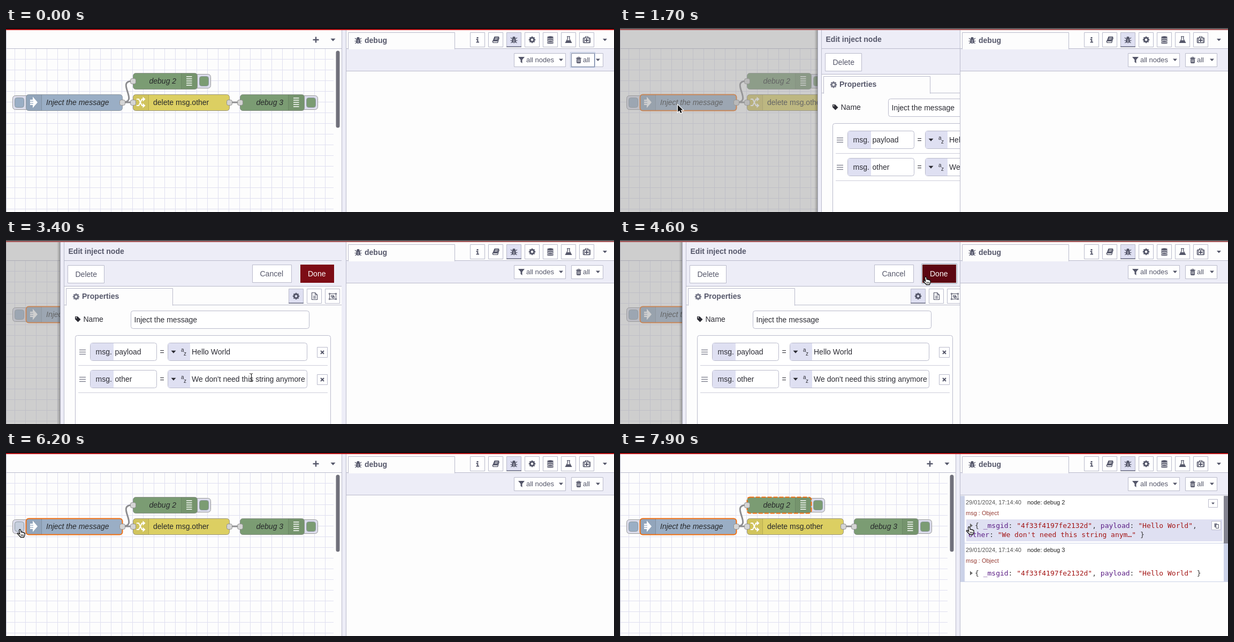
Write an HTML page with a canvas that moves like this. It is 1136 by 344 pixels and loops after 8000 ms.

```html
<!DOCTYPE html>
<html lang="en">
<head>
<meta charset="utf-8">
<title>Flow editor</title>
<style>
html, body { margin: 0; width: 1136px; height: 344px; overflow: hidden; background: #fdfdfd; }
canvas { display: block; width: 1136px; height: 344px; }
</style>
</head>
<body>
<canvas id="stage" width="1136" height="344"></canvas>
<script>
const W = 1136, H = 344, LOOP = 8000, STEP = 100;
const c = document.getElementById('stage').getContext('2d');

const SANS = '"Liberation Sans", Arial, sans-serif';
const MONO = '13px "DejaVu Sans Mono", monospace';
const F14 = '14px ' + SANS, B14 = 'bold 14px ' + SANS, I14 = 'italic 14px ' + SANS;
const F13 = '13px ' + SANS, F11 = '11px ' + SANS;

const PAGE = '#fdfdfd', LAV = '#ededf7', PICK = '#dfe0f2', EDGE = '#b9bacb';
const INK = '#55576a', DARK = '#2c2c34', ORANGE = '#f27012';
const BLUE = '#9aaec5', GREEN = '#7b9c73', YELLOW = '#dccf62';

// Drawing helpers
function box(x, y, w, h, fill, stroke, r = 0, lw = 1) {
  c.beginPath();
  c.roundRect(x + .5, y + .5, w - 1, h - 1, r);
  if (fill) { c.fillStyle = fill; c.fill(); }
  if (stroke) { c.strokeStyle = stroke; c.lineWidth = lw; c.stroke(); }
}
function fill(x, y, w, h, color) {
  c.fillStyle = color;
  c.fillRect(x, y, w, h);
}
function text(s, x, y, font = F14, color = DARK) {
  c.font = font;
  c.fillStyle = color;
  c.fillText(s, x, y);
}
function trace(pts) {
  c.beginPath();
  for (let i = 0; i < pts.length; i += 2) c.lineTo(pts[i], pts[i + 1]);
}
function poly(pts, color) {
  trace(pts);
  c.closePath();
  c.fillStyle = color;
  c.fill();
}
function line(pts, color, lw = 1) {
  trace(pts);
  c.strokeStyle = color;
  c.lineWidth = lw;
  c.stroke();
}
function disc(x, y, rx, ry, color) {
  c.beginPath();
  c.ellipse(x, y, rx, ry, 0, 0, 7);
  c.fillStyle = color;
  c.fill();
}
const caret = (x, y, s = 4, color = INK) =>
  poly([x - s, y - s / 2, x + s, y - s / 2, x, y + s / 2 + .5], color);
const caretRight = (x, y) => poly([x, y - 4, x + 5, y, x, y + 4], '#666');

// Icons, each centred on x, y
function bug(x, y) {
  line([x - 6, y - 4, x - 3, y - 1.5, x + 3, y - 1.5, x + 6, y - 4], INK, 1.2);
  line([x - 6.5, y + 1.5, x + 6.5, y + 1.5], INK, 1.2);
  line([x - 5.5, y + 6, x - 3, y + 3.5, x + 3, y + 3.5, x + 5.5, y + 6], INK, 1.2);
  disc(x, y - 3.5, 2.8, 2.6, INK);
  disc(x, y + 1.8, 3.7, 4.4, INK);
  line([x, y - 1, x, y + 6], LAV, 1);
}
function gear(x, y, color = INK) {
  for (let i = 0; i < 8; i++) {
    const a = i * Math.PI / 4, u = Math.cos(a), v = Math.sin(a);
    line([x + u * 4, y + v * 4, x + u * 6.2, y + v * 6.2], color, 2.6);
  }
  c.beginPath();
  c.arc(x, y, 3.6, 0, 7);
  c.lineWidth = 2.8;
  c.stroke();
}
function info(x, y) {
  fill(x - 1.5, y - 5, 3, 2.5, INK);
  line([x - 2.5, y - .5, x + .3, y - .5, x + .3, y + 4.5], INK, 2);
  line([x - 2.5, y + 4.5, x + 3, y + 4.5], INK, 1.8);
}
function book(x, y) {
  poly([x - 2.5, y - 6, x + 6.5, y - 6, x + 3.5, y + 3, x - 6, y + 3], INK);
  line([x - 6, y + 2, x - 5, y + 5.3, x + 3.6, y + 5.3, x + 6.5, y - 4], INK, 1.3);
  line([x - 1, y - 3.5, x + 4, y - 3.5], '#fff');
  line([x - 2, y - 1, x + 3, y - 1], '#fff');
}
function database(x, y) {
  disc(x, y - 4.5, 6, 2.2, INK);
  for (let i = 0; i < 3; i++) {
    const top = y - 3 + i * 3.5;
    fill(x - 6, top, 12, 2, INK);
    disc(x, top + 2, 6, 1.4, INK);
  }
  for (let i = 0; i < 3; i++) line([x - 6, y - 2.8 + i * 3.5, x, y - 1.6 + i * 3.5, x + 6, y - 2.8 + i * 3.5], '#fff', .9);
}
function flask(x, y) {
  line([x - 3, y - 6, x + 3, y - 6], INK, 1.3);
  line([x - 1.8, y - 6, x - 1.8, y - 1.5, x - 5.5, y + 5.3, x + 5.5, y + 5.3, x + 1.8, y - 1.5, x + 1.8, y - 6], INK, 1.3);
  poly([x - 3, y + 1, x + 3, y + 1, x + 5, y + 5, x - 5, y + 5], INK);
}
function kit(x, y) {
  box(x - 7, y - 4, 14, 10, null, INK, 1, 1.4);
  line([x - 4.5, y - 4, x - 4.5, y + 6], INK, 1.2);
  line([x + 4.5, y - 4, x + 4.5, y + 6], INK, 1.2);
  line([x - 2.5, y - 4, x - 2.5, y - 6, x + 2.5, y - 6, x + 2.5, y - 4], INK, 1.2);
  line([x, y - 2.2, x, y + 4.2], INK, 2);
  line([x - 3.2, y + 1, x + 3.2, y + 1], INK, 2);
}
function page(x, y) {
  line([x - 4.5, y - 6.5, x + 1.5, y - 6.5, x + 5.5, y - 2.5, x + 5.5, y + 6.5, x - 4.5, y + 6.5, x - 4.5, y - 7], INK, 1.2);
  line([x + 1.5, y - 6.5, x + 1.5, y - 2.5, x + 5.5, y - 2.5], INK);
  for (const d of [0, 2, 4]) line([x - 2, y + d, x + 3, y + d], INK);
}
function group(x, y) {
  box(x - 6, y - 5, 13, 11, null, INK);
  for (const u of [-7, 5]) for (const v of [-6, 4]) box(x + u, y + v, 3, 3, '#fff', INK);
  box(x - 3, y - 2, 6, 4, null, INK);
  box(x - 1, y, 5, 4, null, INK);
}
function trash(x, y) {
  line([x - 5, y - 3.5, x + 5, y - 3.5], INK, 1.4);
  line([x - 2, y - 4, x - 1.5, y - 5.5, x + 1.5, y - 5.5, x + 2, y - 4], INK, 1.2);
  box(x - 4, y - 3, 8, 9, INK, INK, 1);
  for (const d of [-2, 0, 2]) line([x + d, y - 1.5, x + d, y + 4], '#fff', .8);
}
function tag(x, y) {
  poly([x - 5, y - 5, x, y - 5, x + 5.5, y + .5, x + .5, y + 5.5, x - 5, y], DARK);
  disc(x - 2.7, y - 2.7, 1.1, 1.1, '#fff');
}

// Flow nodes
function button(x, y, inner, color) {
  box(x, y + 2, 32, 27, '#dcddec', '#999', 5);
  box(inner, y + 6, 18, 19, color, '#8c98a0', 4);
}
function node(x, y, w, color, label, tx, font, stroke = '#999', dash) {
  box(x, y, w + 1, 31, color, null, 5);
  c.setLineDash(dash ? [8, 3] : []);
  box(x, y, w + 1, 31, null, stroke, 5, stroke === ORANGE ? 2 : 1);
  c.setLineDash([]);
  text(label, tx, y + 20, font, '#27292b');
}
function iconStrip(x, y, side) {
  fill(x + 1, y + 1, 29, 29, 'rgba(0,0,0,.05)');
  fill(side, y + 1, 1, 29, 'rgba(0,0,0,.13)');
}
function port(x, y) { box(x - 5, y - 5, 11, 11, '#d4d4d4', '#909090', 3); }
function debugNode(x, y, label, lit) {
  button(x + 114, y, x + 124, GREEN);
  node(x, y, 120, GREEN, label, x + 30.5, I14, lit ? ORANGE : '#8b938a', lit);
  iconStrip(x + 90, y, x + 90);
  for (let i = 0; i < 5; i++) {
    const v = y + 7 + i * 4;
    line([x + 100, v, x + 110.5, v], '#fff', 1.5);
  }
}
function canvasArea(s) {
  fill(0, 4, 627, H - 4, PAGE);
  for (let x = 16; x < 612; x += 20) fill(x, 39, 1, H - 39, '#dfdff0');
  for (let y = 58; y < H; y += 20) fill(1, y, 611, 1, '#dfdff0');
  fill(0, 4, 1, H, EDGE);
  fill(0, 38, 627, 1, EDGE);
  line([573.5, 22, 584.5, 22], INK, 2.4);
  line([579, 16.5, 579, 27.5], INK, 2.4);
  caret(611, 22, 4.5);
  box(616, 42, 8, 145, '#70707b', null, 4);

  c.beginPath();
  c.moveTo(217, 139);
  c.bezierCurveTo(250.5, 139, 203.5, 99, 237, 99);
  c.moveTo(217, 139); c.lineTo(237, 139);
  c.moveTo(417, 139); c.lineTo(437, 139);
  c.strokeStyle = '#8d8d90';
  c.lineWidth = 3;
  c.stroke();

  button(12, 124, 16, s.pressed ? '#c6cfde' : BLUE);
  node(37, 124, 180, BLUE, 'Inject the message', 75, I14, s.selected ? ORANGE : '#8f979f');
  iconStrip(37, 124, 66);
  poly([50, 128.5, 59, 139, 50, 149.5, 50, 144, 45, 144, 45, 134, 50, 134], '#fff');
  line([44, 137, 51, 137], BLUE, 1.3);
  line([44, 141, 51, 141], BLUE, 1.3);

  debugNode(237, 84, 'debug 2', s.hover === 0);
  debugNode(437, 124, 'debug 3', s.hover === 1);

  node(237, 124, 180, YELLOW, 'delete msg.other', 275, F14, '#99957f');
  iconStrip(237, 124, 266);
  for (const d of [-1, 1]) {
    line([244, 139 + d * 6, 248, 139 + d * 6, 254, 139 - d * 6, 257, 139 - d * 6], '#fff', 2);
    poly([255.5, 139 + d * 6 - 4.5, 260.5, 139 + d * 6, 255.5, 139 + d * 6 + 4.5], '#fff');
  }
  port(217, 139); port(237, 99); port(237, 139); port(417, 139); port(437, 139);
}

// Sidebar
function tool(x, y, icon, active) {
  box(x, y, 28, 28, active ? PICK : '#fff', EDGE);
  if (active) fill(x, y + 26, 28, 2, '#84869b');
  icon(x + 14, y + 14);
}
function tab(x, y, h, label, tx) {
  box(x, y, 200, h + 2, PAGE, EDGE);
  fill(x + 1, y + h, 198, 2, PAGE);
  text(label, tx, y + 20, B14, INK);
}
function json(x, y, parts) {
  const colors = { k: '#5c1f86', s: '#a31515', p: '#333' };
  c.font = MONO;
  for (const [kind, s] of parts) {
    text(s, x, y, MONO, colors[kind]);
    x += c.measureText(s).width;
  }
}
function message(y, h, label, hover, more) {
  fill(636, y, 500, h, '#fff');
  fill(636, y, 8, h, '#cbd2e8');
  fill(1128, y, 8, h, hover ? '#83838f' : '#cbd2e8');
  fill(636, y + h - 1, 492, 1, '#cbd2e8');
  if (hover) {
    fill(647, y + 44, 479, h - 48, PICK);
    box(1099, y + 6, 18, 16, '#fff', EDGE);
    caret(1108, y + 14, 3);
    box(1105, y + 47, 18, 17, '#fff', EDGE);
    box(1110, y + 51, 6, 8, '#777989', null);
    box(1113, y + 53, 6, 8, '#fff', INK);
  }
  text('29/01/2024, 17:14:40', 646, y + 16, F11, '#555');
  text('node: ' + label, 761, y + 16, F11, '#222');
  text('msg : Object', 646, y + 36, F11, '#963c34');
  caretRight(654, y + 55.5);
  json(663, y + 60, [['p', '{ '], ['k', '_msgid'], ['p', ': '], ['s', '"4f33f4197fe2132d"'], ['p', ', '],
    ['k', 'payload'], ['p', ': '], ['s', '"Hello World"'], ['p', more ? ',' : ' }']]);
  if (more) json(651, y + 77, [['k', 'other'], ['p', ': '], ['s', '"We don\'t need this string anym…"'], ['p', ' }']]);
}
function sidebar(s) {
  fill(627, 4, 9, H, LAV);
  fill(627, 4, 1, H, EDGE);
  fill(635, 4, 1, H, EDGE);
  fill(636, 4, 500, H, PAGE);
  fill(636, 38, 500, 1, EDGE);
  fill(636, 39, 500, 41, LAV);
  fill(636, 80, 500, 1, EDGE);
  tab(639, 8, 30, 'debug', 670);
  bug(658, 23);
  [info, book, bug, gear, database, flask, kit].forEach((icon, i) => tool(867 + i * 34, 8, icon, i === 2));
  caret(1119, 22);

  box(949, 47, 97, 26, '#fff', EDGE);
  poly([957, 54, 969, 54, 964.5, 59.5, 964.5, 66, 961.5, 63.5, 961.5, 59.5], INK);
  text('all nodes', 972, 64, F13, INK);
  caret(1037, 59.5);
  box(1056, 47, 60, 26, '#fff', EDGE);
  trash(1070, 60);
  text('all', 1078, 64, F13, INK);
  caret(1106, 59.5);
  if (s.focus) {
    box(1054, 45, 47, 29, null, '#b4c2dc');
    box(1056, 47, 44, 26, null, '#74809c');
  }
  if (s.messages) {
    message(82, 89, 'debug 2', s.hover === 0, true);
    message(171, 72, 'debug 3', s.hover === 1, false);
  }
}

// Edit panel
function field(y, key, value) {
  for (const d of [-4, 0, 4]) line([137, y + d + .5, 149, y + d + .5], '#777989', 1.3);
  box(157, y - 17, 125, 34, '#fff', EDGE, 4);
  fill(158, y - 16, 43, 32, PICK);
  text('msg.', 167.5, y + 5);
  text(key, 203.5, y + 5);
  text('=', 287.5, y + 5);
  box(302, y - 17, 261, 34, '#fff', EDGE, 4);
  fill(303, y - 16, 41, 32, PICK);
  caret(313, y, 4.5, DARK);
  text('a', 327, y, '10px ' + SANS);
  text('z', 332, y + 7, '10px ' + SANS);
  text(value, 347, y + 5);
  box(581, y - 9, 20, 20, '#fff', EDGE);
  line([588, y - 2, 594, y + 4], INK, 2);
  line([594, y - 2, 588, y + 4], INK, 2);
  fill(135, y + 25, 466, 1, '#cccdd9');
}
function tray(s) {
  c.save();
  c.beginPath();
  c.rect(0, 4, 635, H);
  c.clip();
  c.translate(Math.round(s.offset), 0);
  const shadow = c.createLinearGradient(95, 0, 102, 0);
  shadow.addColorStop(0, 'rgba(0,0,0,0)');
  shadow.addColorStop(1, 'rgba(0,0,0,.3)');
  fill(95, 4, 7, H, shadow);
  fill(101, 4, 540, H, LAV);
  fill(101, 4, 1, H, '#a9aab9');
  fill(108, 4, 1, H, EDGE);
  fill(109, 87, 518, H, PAGE);
  fill(109, 38, 518, 1, EDGE);
  fill(109, 86, 518, 1, EDGE);
  fill(109, 121, 518, 1, EDGE);
  text('Edit inject node', 116.5, 26, B14, INK);
  box(115, 47, 69, 34, '#fff', EDGE);
  text('Delete', 129.5, 69, F14, INK);
  box(460, 46, 74, 34, '#fff', EDGE);
  text('Cancel', 474.5, 68, F14, INK);
  if (s.clicked) box(548, 44, 67, 38, '#fff', '#8f9cb0', 1);
  fill(550, 46, 63, 34, s.onDone ? '#5c0612' : '#7d0c15');
  text('Done', 564, 68, F14, '#fff');
  tab(112, 90, 31, 'Properties', 142);
  gear(131, 106, '#777989');
  [gear, page, group].forEach((icon, i) => tool(528 + i * 34, 91, icon, i === 0));
  tag(134, 148);
  text('Name', 144.5, 153);
  box(233, 132, 334, 34, '#fff', EDGE, 4);
  text('Inject the message', 239.5, 154);
  box(129, 178, 478, 200, '#fff', EDGE, 4);
  field(209, 'payload', 'Hello World');
  field(260, 'other', "We don't need this string anymore");
  c.restore();
}

// Pointer shapes, hot spot at x, y
const shapes = {
  arrow(x, y) {
    const p = [0, 0, 0, 13, 3, 10.3, 5.2, 15, 7.6, 14, 5.5, 9.4, 9.4, 9.2].map((v, i) => v + (i % 2 ? y : x));
    trace(p);
    c.closePath();
    c.strokeStyle = '#fff';
    c.lineWidth = 2.4;
    c.stroke();
    poly(p, '#111');
  },
  hand(x, y) {
    const p = [-1.5, 1, 0, -.5, 1.5, 1, 2.3, 5, 4, 4.4, 5, 5.6, 6.6, 5.2, 7.4, 6.4, 9, 6.5, 9, 10, 7.4, 14.5, 1.5, 14.5, -2, 10.5,
      -4.8, 7.5, -3.5, 6.2, -.2, 8.6].map((v, i) => v + (i % 2 ? y : x));
    poly(p, '#fff');
    trace(p);
    c.closePath();
    c.lineJoin = 'round';
    c.strokeStyle = '#111';
    c.lineWidth = 1.3;
    c.stroke();
    c.lineJoin = 'miter';
    for (const d of [2.2, 4.2, 6.2]) line([x + d, y + 9, x + d, y + 12.5], '#111', .9);
  },
  cross(x, y) {
    fill(x - 7, y - 1, 15, 3, 'rgba(255,255,255,.7)');
    fill(x - 1, y - 7, 3, 15, 'rgba(255,255,255,.7)');
    fill(x - 6, y, 13, 1, '#111');
    fill(x, y - 6, 1, 13, '#111');
  },
  beam(x, y) {
    line([x - 3, y - 7.5, x, y - 6.5, x + 3, y - 7.5], '#222');
    line([x + .5, y - 7, x + .5, y + 7], '#222', 1.2);
    line([x - 3, y + 7.5, x, y + 6.5, x + 3, y + 7.5], '#222');
  }
};

// Motion
const path = [[100, 1070, 62], [900, 122, 162], [1000, 122, 162], [1300, 108, 144], [2000, 108, 144],
  [2600, 392, 214], [3000, 424, 214], [3500, 462, 262], [3800, 462, 262], [4400, 571, 69],
  [5000, 571, 68], [5900, 26, 145], [6700, 26, 145], [7600, 652, 140], [8000, 652, 140]];
const ease = p => { p = Math.min(1, Math.max(0, p)); return p * p * (3 - 2 * p); };
function pointer(t) {
  const i = Math.max(1, path.findIndex(k => k[0] > t));
  const [t0, x0, y0] = path[i - 1], [t1, x1, y1] = path[i];
  const p = ease((t - t0) / (t1 - t0));
  return [Math.round(x0 + (x1 - x0) * p), Math.round(y0 + (y1 - y0) * p)];
}
const inside = (x, y, l, t, r, b) => x >= l && x <= r && y >= t && y <= b;

function state(t) {
  const [x, y] = pointer(t);
  const open = t >= 1575 && t < 4825;
  const s = {
    x, y, open,
    offset: 535 * (1 - ease((t - 1575) / 250) + ease((t - 4575) / 250)),
    focus: t < 1400,
    selected: t >= 1400,
    clicked: t >= 4500,
    onDone: open && inside(x, y, 550, 46, 613, 80),
    pressed: t >= 6100 && t < 6500,
    messages: t >= 6500,
    hover: -1
  };
  if (s.messages && x > 636) s.hover = y < 171 ? 0 : 1;
  s.shape = 'arrow';
  if (s.onDone || (t > 5000 && inside(x, y, 12, 126, 36, 152)) || (s.hover === 0 && x < 662)) s.shape = 'hand';
  else if (open && inside(x, y, 345, 192, 562, 277)) s.shape = 'beam';
  else if (t > 4600 && inside(x, y, 0, 39, 612, H)) s.shape = 'cross';
  return s;
}

function draw(t) {
  const s = state(t);
  c.clearRect(0, 0, W, H);
  canvasArea(s);
  if (s.open) fill(0, 4, 627, H, 'rgba(160,160,160,.5)');
  sidebar(s);
  if (s.open) tray(s);
  fill(0, 0, W, 2, '#0b0b10');
  fill(0, 2, W, 2, '#c41a1c');
  if (s.open) fill(0, 0, W, 4, 'rgba(160,160,160,.5)');
  if (t >= 100) shapes[s.shape](s.x, s.y);
}

const start = performance.now();
function tick() {
  const t = (performance.now() - start) % LOOP;
  draw(Math.floor(t / STEP) * STEP);
  requestAnimationFrame(tick);
}
draw(0);
requestAnimationFrame(tick);
</script>
</body>
</html>
```
